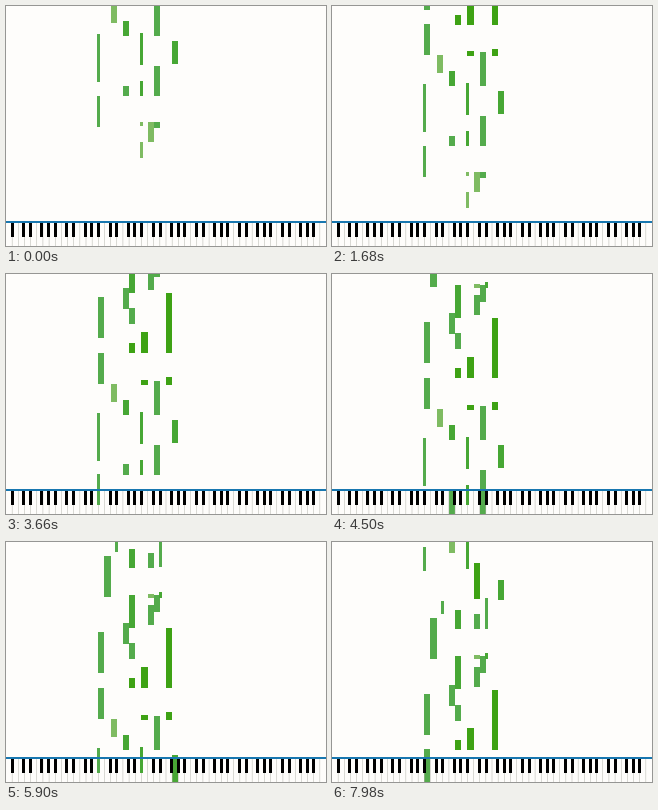
These frames come from a looping animation (320 by 240 pixels, 8000 ms). An HTML page with a canvas:

```html
<!DOCTYPE html>
<html lang="en">
<head>
<meta charset="utf-8">
<title>Falling notes</title>
<style>
  html, body { margin: 0; width: 100%; height: 100%; overflow: hidden; background: #fefdfb; }
  canvas { display: block; width: 100vw; height: 100vh; }
</style>
</head>
<body>
<canvas id="stage" width="320" height="240"></canvas>
<script>
const ctx = document.getElementById('stage').getContext('2d');
const W = 320, H = 240, LOOP = 8000;
const WHITE_KEYS = 52, KEY_W = W / WHITE_KEYS, BLACK_W = 3;
const KEYS_Y = 217, BLACK_BOTTOM = 231, HIT_Y = 215.3;
const STEP = 1.4; // pixels fallen per step
const PAPER = '#fefdfb';

const SHADES = { l: '#7fbb62', m: '#54ab4c', g: '#47a734', s: '#3ea214' };

// Offsets of the black keys from the gaps, by white key counted from A.
const BLACK_SHIFT = { 0: 0.3, 2: -0.6, 3: 0.2, 5: -1, 6: -0.3 };

// Key index (a half marks the black key to its right): [top, bottom, shade] at time zero.
const NOTES = {
  14.5: [[28, 76, 'm'], [89.5, 121, 'm'], [-234.5, -210.5, 'm']],
  15: [[-32, -1, 'm'], [-87.6, -46.6, 'm']],
  16: [[-163.5, -122.5, 'm']],
  17: [[-1, 17, 'l']],
  17.5: [[-180, -167.5, 'm']],
  19: [[15, 30, 'g'], [79.5, 90, 'm'], [-96.6, -75.6, 'm'], [-245, -228.5, 'l']],
  20: [[-76.6, -60.6, 'm'], [-41.6, -31.6, 's'], [-125, -92, 'g'], [-171, -152, 'g']],
  21.5: [[27, 59, 'g'], [75, 90, 'g'], [116, 120, 'l'], [136, 151.5, 'l'], [-245, -212, 'g']],
  22: [[-5, 0, 's'], [-53, -31.6, 's']],
  23: [[116, 136, 'l'], [-114.6, -94.6, 'm'], [-126, -122, 'l'], [-167, -152, 'm'], [-218, -182, 's']],
  24: [[-4, 30, 'm'], [60, 90, 'm'], [115.5, 121.5, 'm'], [-125, -108, 'm']],
  24.5: [[-128, -122, 'g'], [-183, -152.5, 'm']],
  26: [[-7.5, 0, 's'], [-91.6, -31.6, 's']],
  27: [[35, 58, 'g'], [-201, -181, 'g']]
};

const isBlack = key => key % 1 !== 0;

// Left and right edge of a key in whole pixels.
function keySpan(key) {
  if (!isBlack(key)) return [Math.round(key * KEY_W), Math.round((key + 1) * KEY_W)];
  const k = key - 0.5;
  const left = Math.round((k + 1) * KEY_W - BLACK_W / 2 + BLACK_SHIFT[k % 7]);
  return [left, left + BLACK_W];
}

function fillKey(key, top, bottom, color) {
  const [left, right] = keySpan(key);
  ctx.fillStyle = color;
  ctx.fillRect(left, top, right - left, bottom - top);
}

function rect(x, y, w, h, color) {
  ctx.fillStyle = color;
  ctx.fillRect(x, y, w, h);
}

// Steps come in threes, lasting 20, 100 and 20 ms.
function stepAt(t) {
  const m = t % 140;
  return 3 * Math.floor(t / 140) + (m < 20 ? 0 : m < 120 ? 1 : 2);
}

function drawNotes(fall) {
  const lit = {};
  for (const [name, list] of Object.entries(NOTES)) {
    const key = Number(name);
    for (const [top, bottom, shade] of list) {
      const y = top + fall, end = bottom + fall;
      fillKey(key, Math.round(y), Math.round(end), SHADES[shade]);
      if (y <= HIT_Y && end > HIT_Y) lit[key] = SHADES[shade];
    }
  }
  return lit;
}

function drawKeyboard(lit) {
  rect(0, KEYS_Y, W, H - KEYS_Y, PAPER);
  for (let k = 0; k < WHITE_KEYS; k++) {
    if (lit[k]) fillKey(k, KEYS_Y, H, lit[k]);
    if (k) rect(k * KEY_W - 0.25, KEYS_Y, 0.5, H - KEYS_Y, '#b4b4ac');
  }
  for (let k = 0; k < WHITE_KEYS - 1; k++) {
    if (!(k % 7 in BLACK_SHIFT)) continue;
    const key = k + 0.5;
    fillKey(key, KEYS_Y, BLACK_BOTTOM, lit[key] || '#000');
  }
  rect(0, 215, W, 2, '#1877b0');
}

function frame(now) {
  rect(0, 0, W, H, PAPER);
  drawKeyboard(drawNotes(STEP * stepAt(now % LOOP)));
  requestAnimationFrame(time => frame(Math.max(0, time - start)));
}

const start = performance.now();
frame(0);
</script>
</body>
</html>
```
